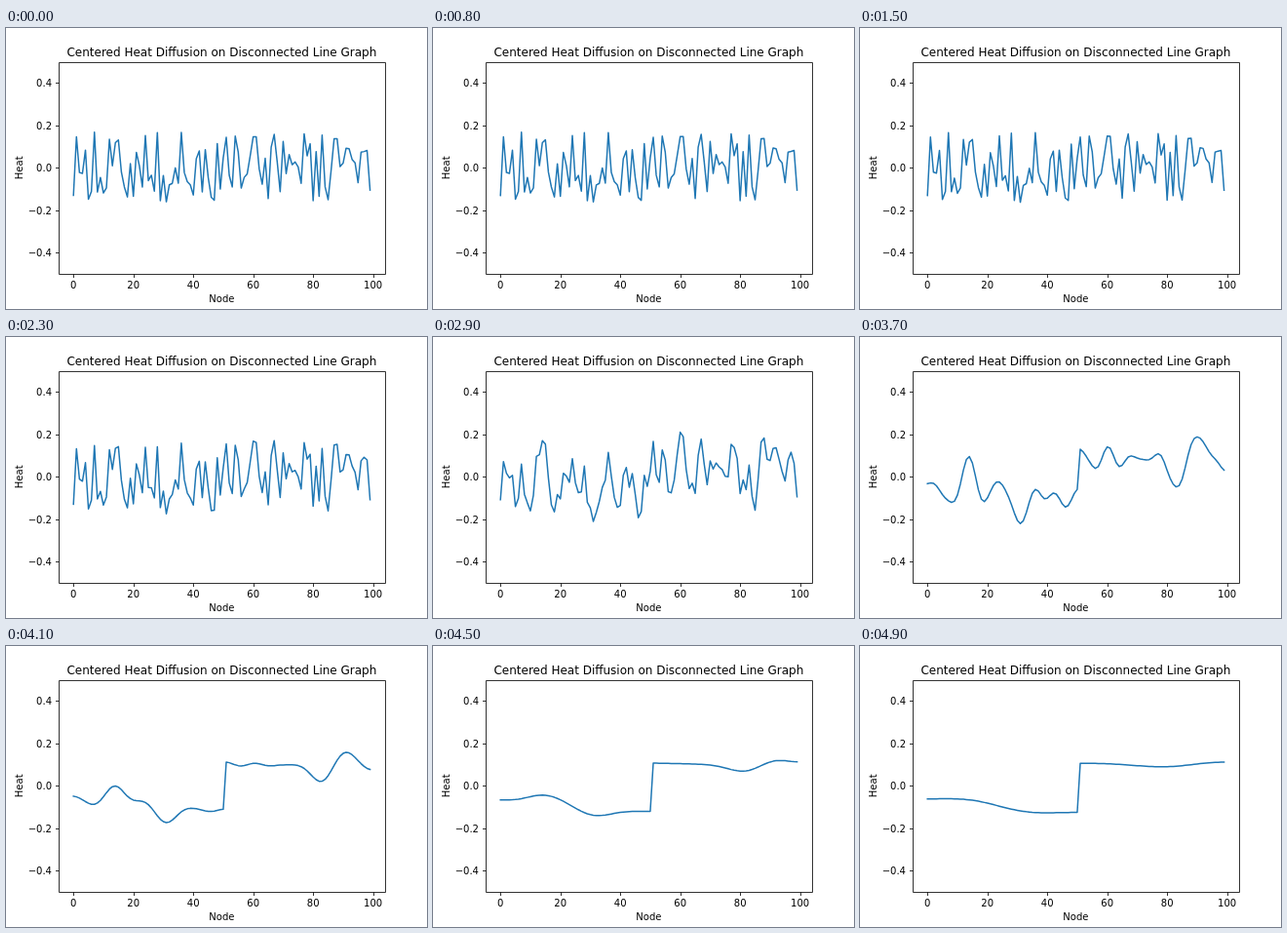
An HTML page that plays this animation: 432x288 px, repeating every 5 s.

```html
<!DOCTYPE html>
<html lang="en">
<head>
<meta charset="utf-8">
<title>Heat diffusion</title>
<style>
  html, body { margin: 0; width: 100%; height: 100%; overflow: hidden; background: #fff; }
  svg { display: block; width: 432px; height: 288px; }
  text { font: 10px "DejaVu Sans", sans-serif; text-anchor: middle; fill: #000; }
  text.title { font-size: 12px; }
  text.left { text-anchor: end; }
  .axes { fill: none; stroke: #000; stroke-width: .8; }
  .curve { fill: none; stroke: #1f77b4; stroke-width: 1.5; stroke-linejoin: round; stroke-linecap: square; }
</style>
</head>
<body>
<svg viewBox="0 0 432 288">
  <path class="curve" id="curve"/>
  <path class="axes" id="axes"/>
  <g id="labels"></g>
  <text class="title" x="221.4" y="29">Centered Heat Diffusion on Disconnected Line Graph</text>
  <text x="221.4" y="281">Node</text>
  <text transform="translate(17 143.3) rotate(-90)">Heat</text>
</svg>
<script>
const LOOP = 5000, STEP = 100;
const SPLIT = 51; // the line graph is cut before this node

// starting heat of each node, in thousandths
const START = [
  -130, 147, -22, -26, 84, -148, -111, 169, -114, -45,
  -118, -95, 135, 10, 119, 132, -20, -90, -137, 20,
  -134, 73, 10, -90, 153, -60, -35, -110, 167, -155,
  -36, -160, -80, -73, 0, -72, 167, -22, -65, -80,
  -128, 43, 80, -113, 86, -47, -139, -153, 115, -100,
  48, 144, -35, -90, 150, 75, -95, -45, -28, 58,
  147, 147, -5, -77, 45, -145, 98, 158, 30, -112,
  125, -27, 63, 15, 28, 5, -73, 161, 57, 114,
  -155, 77, -134, 155, -90, -150, -12, 137, 138, 6,
  22, 93, 90, 40, 24, -70, 74, 77, 82, -105
].map(v => v / 1000);

const px = node => 69.218 + node * 3.0743;
const py = heat => 143.28 - heat * 217.44;
const snap = v => Math.floor(v + .5) + .5;
const $ = id => document.getElementById(id);

// Exact heat flow on a path, through its cosine modes
function path(heat) {
  const n = heat.length;
  const wave = (m, i) => Math.cos(Math.PI * m * (i + .5) / n);
  const modes = heat.map((_, m) =>
    heat.reduce((sum, h, i) => sum + h * wave(m, i), 0) * (m ? 2 : 1) / n);
  return time => {
    const faded = modes.map((a, m) =>
      a * Math.exp(-time * (2 - 2 * Math.cos(Math.PI * m / n))));
    return heat.map((_, i) => faded.reduce((sum, a, m) => sum + a * wave(m, i), 0));
  };
}

const parts = [path(START.slice(0, SPLIT)), path(START.slice(SPLIT))];

// Centre on zero and scale to unit length
function normalise(values) {
  const mean = values.reduce((a, b) => a + b, 0) / values.length;
  const centred = values.map(v => v - mean);
  const size = Math.hypot(...centred);
  return centred.map(v => v / size);
}

function drawAxes() {
  let d = 'M54.5 35.5H389.5V252.5H54.5Z', labels = '';
  for (let node = 0; node <= 100; node += 20) {
    d += `M${snap(px(node))} 252.5v3.5`;
    labels += `<text x="${px(node)}" y="267">${node}</text>`;
  }
  for (let i = -2; i <= 2; i++) {
    const y = snap(py(i / 5));
    d += `M54.5 ${y}h-3.5`;
    labels += `<text class="left" x="47" y="${y + 3.5}">${i < 0 ? '\u2212' : ''}${Math.abs(i / 5).toFixed(1)}</text>`;
  }
  $('axes').setAttribute('d', d);
  $('labels').innerHTML = labels;
}

let shown = -1;
function draw() {
  let step = Math.floor(performance.now() % LOOP / STEP);
  if (step < 3) step = 0;
  if (step !== shown) {
    shown = step;
    const time = Math.exp(-7.95 + 12 * step / 49);
    const heat = normalise(parts.flatMap(part => part(time)));
    $('curve').setAttribute('d', 'M' + heat.map((h, i) =>
      px(i).toFixed(2) + ' ' + py(h).toFixed(2)).join('L'));
  }
  requestAnimationFrame(draw);
}

drawAxes();
draw();
</script>
</body>
</html>
```
